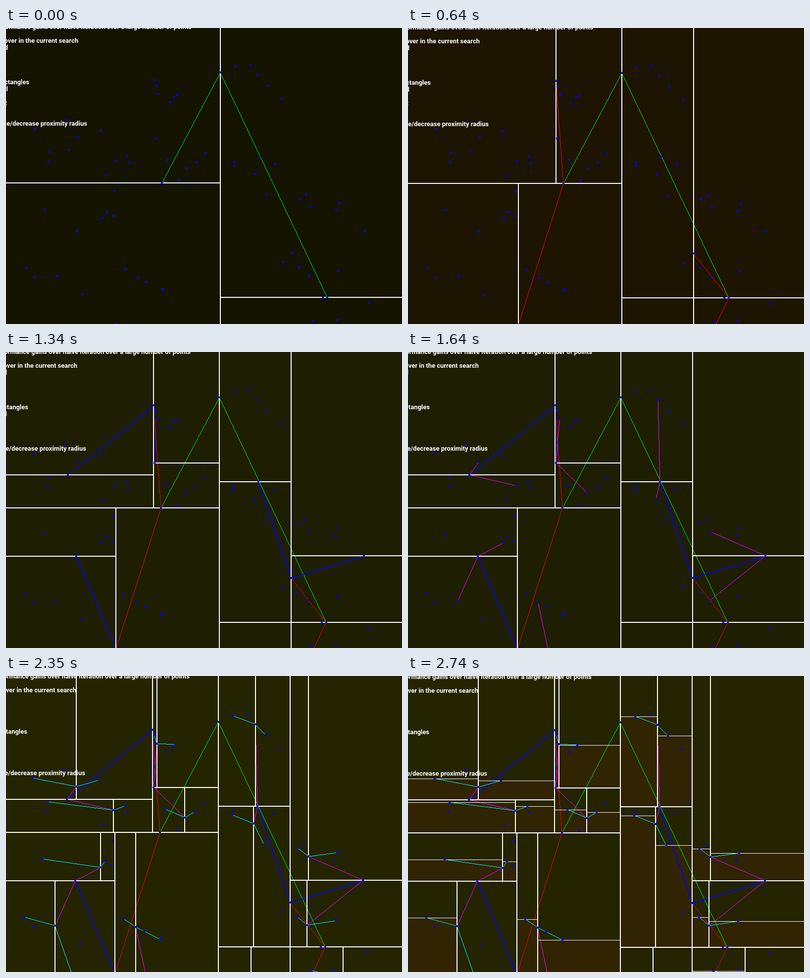
An HTML page with a canvas that plays this animation: 800 px wide and 600 px high, repeating every 3190 ms.

```html
<!DOCTYPE html>
<html lang="en">
<head>
<meta charset="utf-8">
<title>k-d tree</title>
<style>
html, body { margin: 0; width: 100%; height: 100%; overflow: hidden; background: #141400; }
canvas { display: block; }
</style>
</head>
<body>
<canvas id="stage" width="800" height="600"></canvas>
<script>
const ctx = document.getElementById('stage').getContext('2d');
const LOOP = 3190;
const STEPS = [280, 640, 940, 1290, 1640, 1990, 2350, 2740];
const GROUND = ['#141400', '#1e1402', '#1e1e02', '#242400', '#242400'];
const EDGE = ['', '#0f0', '#f00', '#00f', '#f0f', '#0ff'];
const LAST = 5;

// Key points in order of insertion; the tree follows from them.
const KEYS = [
  [429, 94], [311, 318], [645, 550],
  [296, 110], [220, 604], [574, 460], [574, 697],
  [123, 251], [298, 227], [140, 416], [300, 690],
  [508, 265], [721, 415], [530, 760], [640, 760],
  [142, 225], [217, 273], [305, 138], [361, 288], [191, 389], [99, 507], [262, 510],
  [504, 99], [500, 300], [611, 367], [608, 506], [495, 650], [681, 615]];

// Row, right edge, text
const TEXT = [
  [0, 371, 'ormance gains over naive iteration over a large number of points'],
  [2, 142, 'over in the current search'],
  [3, 0, 'd'],
  [8, 43, 'ctangles'],
  [9, 0, 'l'],
  [11, -2, 't'],
  [14, 160, 'se/decrease proximity radius']];

const nodes = [];

// Even depths split the cell at x, odd depths at y.
function insert(x, y) {
  const node = { x, y, depth: 0, x0: -4, y0: -4, x1: 804, y1: 1000, kids: [] };
  let side = 0;
  for (let at = nodes[0]; at; at = at.kids[side]) {
    const axis = at.depth % 2 ? 'y' : 'x';
    side = node[axis] < at[axis] ? 0 : 1;
    node[axis + (1 - side)] = at[axis];
    node.parent = at;
    node.depth = at.depth + 1;
  }
  if (node.parent) node.parent.kids[side] = node;
  nodes.push(node);
}

let seed = 7;
function random() {
  seed = seed * 16807 % 2147483647;
  return seed / 2147483647;
}

for (const [x, y] of KEYS) insert(x, y);

// Each cell of the last key level gets a leaf on both sides and two loose points.
const loose = [];
for (const n of nodes.filter(n => n.depth === LAST - 1)) {
  insert(Math.round(n.x - 0.6 * (n.x - n.x0)), n.y - 17);
  insert(Math.round(n.x + 0.3 * (n.x1 - n.x)), Math.round(n.y - 20 + (n.y1 - n.y) / 4));
  for (let i = 0; i < 2; i++) {
    loose.push({ x: Math.round(n.x + 120 * random() - 60), y: Math.round(n.y + 120 * random() - 60) });
  }
}

// Hard-edged line; the third level is wide and dashed.
function drawEdge({ x, y, depth, parent }) {
  const dx = x - parent.x, dy = y - parent.y;
  const count = Math.max(Math.abs(dx), Math.abs(dy));
  const dashed = depth === 3, size = dashed ? 2 : 1;
  ctx.fillStyle = EDGE[depth];
  for (let i = 0; i <= count; i++) {
    if (dashed && i % 6 > 3) continue;
    ctx.fillRect(Math.floor(parent.x + dx * i / count), Math.floor(parent.y + dy * i / count), size, size);
  }
}

function drawSplit(n) {
  ctx.fillStyle = '#fff';
  if (n.depth % 2 === 0) {
    ctx.fillRect(n.x - 1, n.y0, 2, n.y1 - n.y0);
  } else {
    const thick = n.depth < LAST ? 2 : 1;
    ctx.fillRect(n.x0, n.y - thick + 1, n.x1 - n.x0, thick);
  }
}

function draw(time) {
  // Steps alternate: new edges with a nudge left, new splits with a nudge down.
  const step = STEPS.filter(t => t <= time).length;
  const down = Math.floor(step / 2), left = Math.ceil(step / 2);
  const splits = nodes.filter(n => n.depth <= down + 1);
  const edges = nodes.filter(n => n.parent && n.depth <= left + 1);

  ctx.setTransform(1, 0, 0, 1, 0, 0);
  ctx.fillStyle = GROUND[down];
  ctx.fillRect(0, 0, 800, 600);
  ctx.translate(4 - left, down - 4);

  ctx.fillStyle = '#302402';
  for (const n of splits) {
    if (n.depth === LAST) ctx.fillRect(n.x0, n.y, n.x1 - n.x0, n.y1 - n.y);
  }
  edges.forEach(drawEdge);
  splits.forEach(drawSplit);

  ctx.fillStyle = '#00f';
  for (const { x, y } of [...nodes, ...loose]) ctx.fillRect(x - 2, y - 2, 4, 4);

  ctx.fillStyle = '#fff';
  ctx.font = 'bold 13px Roboto, sans-serif';
  ctx.textAlign = 'right';
  for (const [row, right, text] of TEXT) ctx.fillText(text, right, 6 + 14 * row);
}

function tick() {
  draw(performance.now() % LOOP);
  requestAnimationFrame(tick);
}
tick();
</script>
</body>
</html>
```
